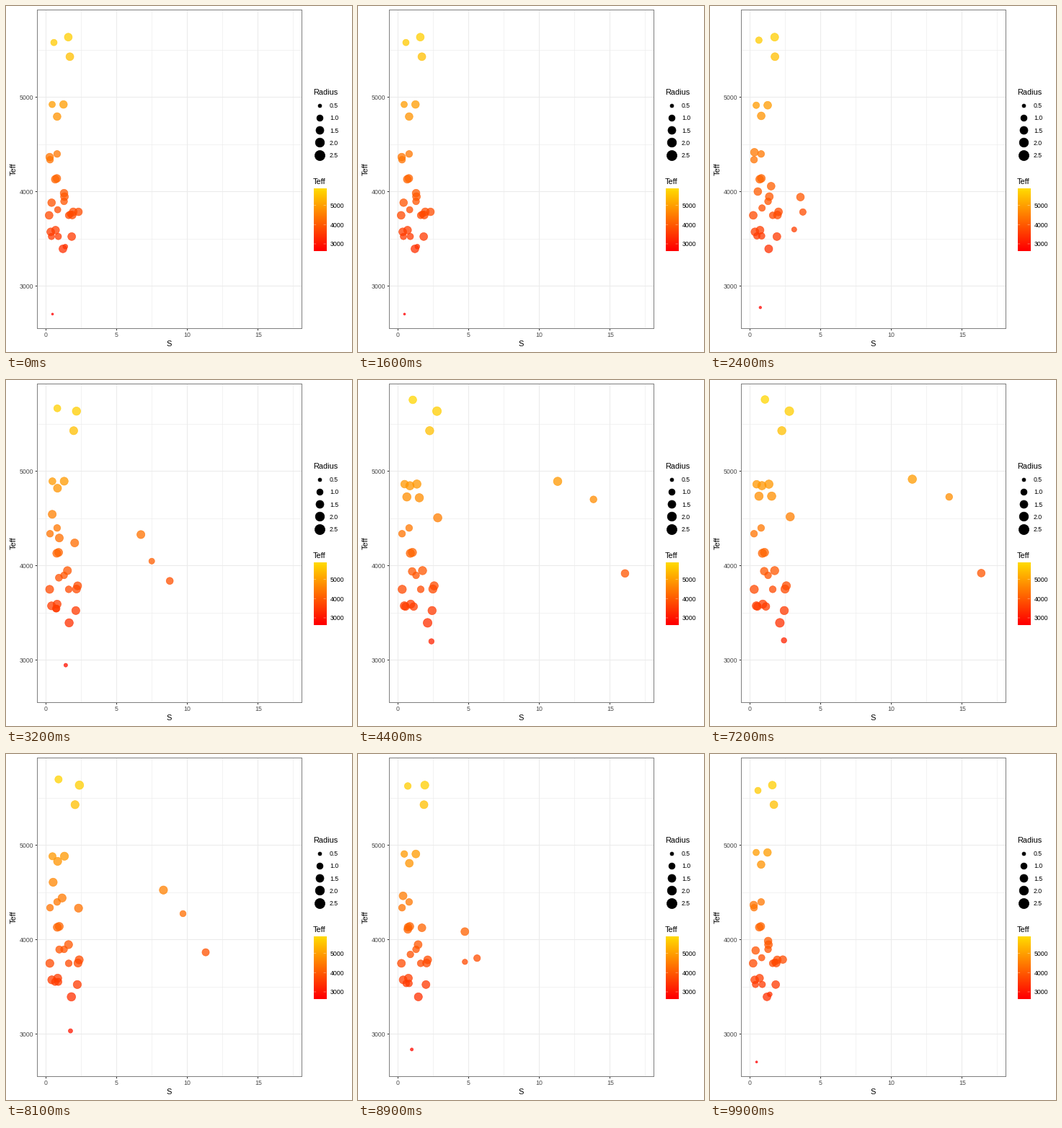
Animation of 480 by 480 pixels, one loop 10000 ms. Source, as a matplotlib script:

```python
import numpy as np
import matplotlib.pyplot as plt
from matplotlib.animation import FuncAnimation

SIZE, DPI = 480, 72          # one point equals one pixel
FRAMES, INTERVAL = 100, 100
LEFT, RIGHT, TOP, BOTTOM = 43.5, 410.5, 5.5, 447.5
T_MIN, T_MAX = 2706, 5773
ALPHA, EDGE = 0.75, 0.7
TICK, BORDER, GRID = "#333333", "#7f7f7f", "#ebebeb"

plt.rcParams["font.family"] = "Liberation Sans"

# Dots that keep their Teff: growth of S -> (S, Teff)
STEADY = {
    1.0: [(0.30, 4341), (0.80, 4402), (1.29, 3900), (1.62, 3752)],
    1.35: [(1.70, 5432), (0.67, 4134), (0.78, 4143), (1.32, 3950),
           (0.235, 3752), (1.94, 3789), (1.87, 3755), (0.35, 3577),
           (0.69, 3595), (1.83, 3527)],
    1.8: [(1.59, 5639), (1.21, 3397)],
}
# Dots that travel: radius -> (S, Teff) at both ends
MOVERS = {
    5.7: [((1.25, 4926), (1.355, 4862)), ((0.80, 4798), (0.86, 4853)),
          ((0.275, 4369), (0.67, 4760)), ((1.29, 3987), (2.945, 4552)),
          ((0.41, 3886), (1.61, 4789)), ((2.31, 3789), (12.02, 4985))],
    4.8: [((0.575, 5582), (1.10, 5773)), ((0.45, 4926), (0.485, 4861)),
          ((0.84, 3811), (1.03, 3952)), ((1.73, 3765), (17.21, 3933)),
          ((0.40, 3528), (1.18, 3573)), ((0.885, 3528), (0.52, 3573))],
    3.7: [((1.38, 3421), (14.83, 4808))],
    1.8: [((0.475, 2706), (2.53, 3241))],
}


def build_states():
    """Rows of S, Teff, radius in pixels for the two resting states."""
    start, end = [], []
    for growth, points in STEADY.items():
        r = min(5.8, 5.1 * growth)
        for s, teff in points:
            start.append((s, teff, r))
            end.append((s * growth, teff, r * growth ** 0.2))
    for r, paths in MOVERS.items():
        for a, b in paths:
            start.append((*a, r))
            end.append((*b, 3.4 + 0.5 * r))
    return np.array(start), np.array(end)


START, END = build_states()


def x_px(s):
    return 55.2 + 19.64 * s


def y_px(teff):
    return 126.9 - 0.131 * (teff - 5000)


def mid_pixel(v):
    return np.floor(v) + 0.5


def gradient(teff):
    """Red to gold."""
    u = np.clip((np.asarray(teff) - T_MIN) / (T_MAX - T_MIN), 0, 1)
    return np.stack([np.ones_like(u), u * 215 / 255, np.zeros_like(u)], -1)


def progress(i):
    """Hold, sine ease out, hold, sine ease back."""
    p = np.interp(i, [16, 50, 67, 100], [0, 1, 1, 0])
    return (1 - np.cos(np.pi * p)) / 2


fig = plt.figure(figsize=(SIZE / DPI, SIZE / DPI), dpi=DPI, facecolor="white")
ax = fig.add_axes([0, 0, 1, 1])


def line(x0, y0, x1, y1, color, width=1.0, z=1, **kw):
    ax.plot([x0, x1], [y0, y1], color=color, lw=width, zorder=z,
            snap=False, solid_capstyle="butt", **kw)


def label(x, y, text, size=8.8, color="black", **kw):
    ax.text(x, y, text, fontsize=size, color=color, va="baseline", **kw)


def dot_area(r):
    return (2 * np.asarray(r) - EDGE) ** 2


def draw_panel():
    for s in np.arange(0, 18, 2.5):
        x, major = mid_pixel(x_px(s)), s % 5 == 0
        line(x, TOP, x, BOTTOM, GRID, 1.07 if major else 0.6)
        if major:
            line(x, BOTTOM, x, BOTTOM + 2.75, TICK)
            label(x_px(s), 459, f"{s:.0f}", color="#4d4d4d", ha="center")
    for t in range(3000, 6000, 500):
        y, major = mid_pixel(y_px(t)), t % 1000 == 0
        line(LEFT, y, RIGHT, y, GRID, 1.07 if major else 0.6)
        if major:
            line(LEFT - 2.75, y, LEFT, y, TICK)
            label(38.3, y + 3.3, str(t), color="#4d4d4d", ha="right")
    for x in (LEFT, RIGHT):
        line(x, TOP - 0.5, x, BOTTOM + 0.5, BORDER, z=5)
    for y in (TOP, BOTTOM):
        line(LEFT - 0.5, y, RIGHT + 0.5, y, BORDER, z=5)
    label(226.2, 472, "S", 11, ha="center")
    label(13.5, 226.3, "Teff", 11, ha="center", rotation=90, rotation_mode="anchor")


def draw_legends():
    label(426, 123, "Radius", 11)
    for k, radius in enumerate((0.5, 1.0, 1.5, 2.0, 2.5)):
        y = 137.5 + 17.28 * k
        r = 1.9 + 5.5 * np.sqrt((radius - 0.44) / 2.06)
        ax.scatter([435], [y], s=dot_area(r), c="black", lw=EDGE, antialiased=False)
        label(449, y + 3.5, f"{radius:.1f}")

    label(426, 247, "Teff", 11)
    left, right, top, bottom = 426.7, 444, 253.6, 340
    half_bin = (bottom - top) / 40
    ramp = gradient(np.linspace(T_MAX, T_MIN, 20))[:, None, :]
    ax.imshow(ramp, extent=(left, right, bottom, top), aspect="auto",
              interpolation="bilinear", zorder=2)
    for t in (5000, 4000, 3000):
        y = np.interp(t, [T_MIN, T_MAX], [bottom - half_bin, top + half_bin])
        for x in (left, right - 3.4):
            line(x, y, x + 3.4, y, "white", 0.6, z=3, alpha=0.6)
        label(449.8, y + 3.3, str(t))


draw_panel()
draw_legends()
dots = ax.scatter(START[:, 0], START[:, 1], lw=EDGE, zorder=4)
ax.set_xlim(0, SIZE)
ax.set_ylim(SIZE, 0)
ax.axis("off")


def update(i):
    s, teff, r = (START + (END - START) * progress(i)).T
    rgba = np.column_stack([gradient(teff), np.full(len(teff), ALPHA)])
    dots.set_offsets(np.column_stack([x_px(s), y_px(teff)]))
    dots.set_sizes(dot_area(r))
    dots.set_facecolor(rgba)
    dots.set_edgecolor(rgba)
    return (dots,)


anim = FuncAnimation(fig, update, frames=FRAMES, interval=INTERVAL,
                     repeat=True, repeat_delay=0)
plt.show()
```
